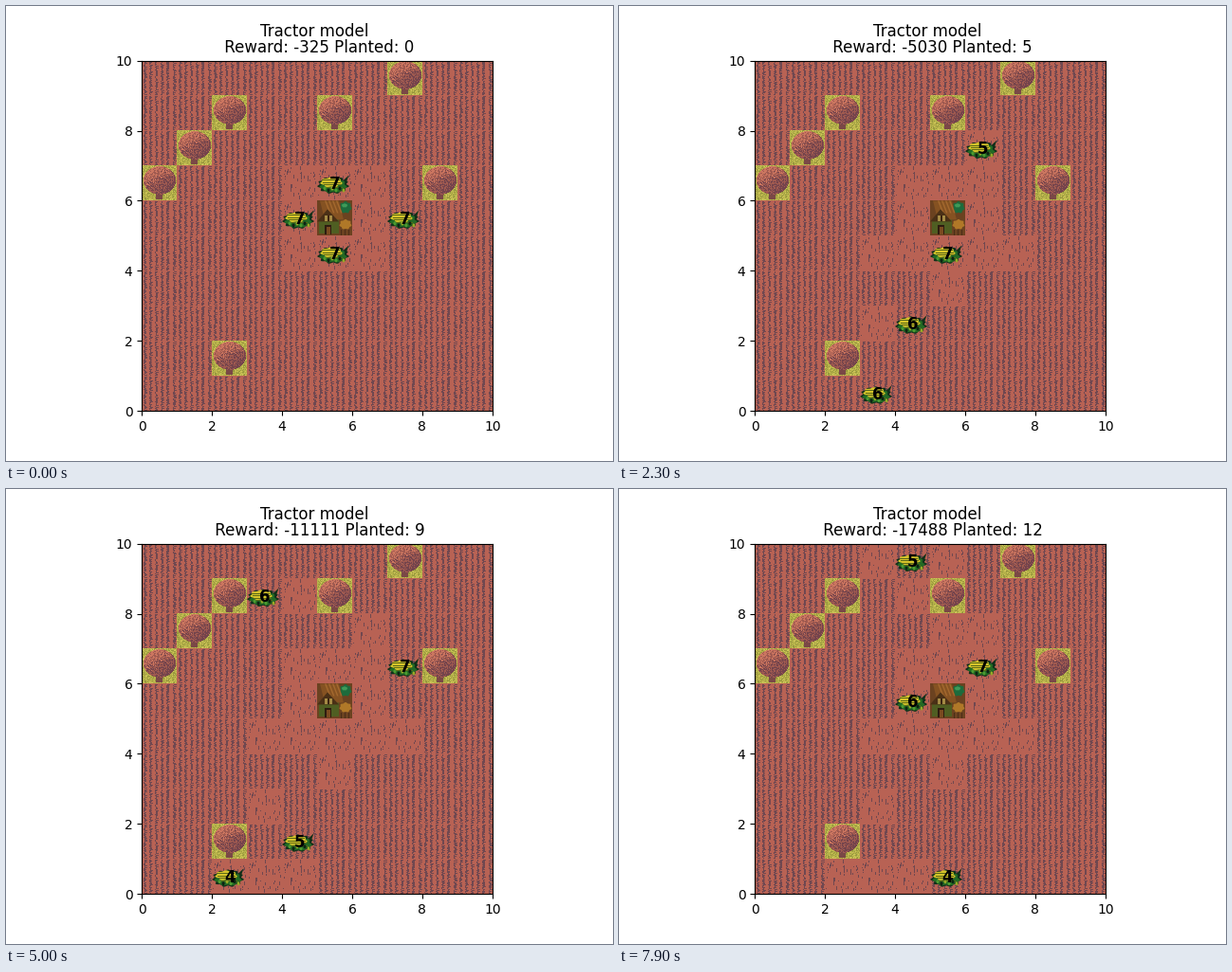
A matplotlib script that plays this animation: 640 px wide and 480 px high, repeating every 8 s.

```python
import random

import numpy as np
import matplotlib.pyplot as plt
from matplotlib.animation import FuncAnimation
from matplotlib.collections import PolyCollection
from matplotlib.transforms import Affine2D

FRAMES, STEP_MS = 80, 100
N, PX = 10, 37                      # cells per side, texture pixels per cell
SOIL, DARK = (184, 98, 84), (112, 72, 80)
FARM, FULL_LOAD = (5, 5), 7
TREES = [(0, 6), (1, 7), (2, 8), (5, 8), (7, 9), (8, 6), (2, 1)]
HOME = [(x, y) for x in (4, 5, 6) for y in (4, 5, 6)]

# At each key time every tractor has reached the last cell of its next leg.
KEY_TIMES = [0, 14, 33, 50, 58, 70, 79]
REWARDS = [-325, -3150, -7119, -11111, -13095, -15268, -17488]

# Earlier cells of a leg are stops: refill on home ground, plant elsewhere.
ROUTES = [
    ["56", "32", "32 20", "30 40 20", "20", "50", "50"],
    ["45", "34 34", "54 44", "76", "69", "59 48", "45"],
    ["75", "74 66", "67 65 56", "48 38", "39", "39 38", "49"],
    ["54", "53 53", "20 31", "41", "46", "57 77", "65 66"],
]

OPEN = {(x, y) for x in range(2, 8) for y in range(N)} - {FARM, *TREES}
rng = np.random.default_rng(4)
dice = random.Random(11)


def neighbours(cell):
    x, y = cell
    around = [(x + 1, y), (x - 1, y), (x, y + 1), (x, y - 1)]
    return [c for c in around if c in OPEN]


def distances(goal):
    dist, queue = {goal: 0}, [goal]
    for cell in queue:
        for c in neighbours(cell):
            if c not in dist:
                dist[c] = dist[cell] + 1
                queue.append(c)
    return dist


def wander(start, goal, steps):
    """Random walk that still reaches the goal in the given steps."""
    dist, path = distances(goal), [start]
    for left in reversed(range(steps)):
        here = path[-1]
        path.append(dice.choice(
            [c for c in neighbours(here) if dist[c] <= left] or [here]))
    return path[1:]


def drive(route, shift):
    """Return [cell, load] per frame and the (frame, cell) plantings."""
    legs = [[tuple(map(int, c)) for c in leg.split()] for leg in route]
    load = FULL_LOAD
    track, planted = [[legs[0][0], load]], []
    for t0, t1, cells in zip(KEY_TIMES, KEY_TIMES[1:], legs[1:]):
        for k, cell in enumerate(cells, 1):
            last = k == len(cells)
            t = t1 if last else t0 + (t1 - t0) * k // len(cells) + shift
            path = wander(track[-1][0], cell, t - len(track) + 1)
            track += [[c, load] for c in path]
            if not last:
                if cell in HOME:
                    load = FULL_LOAD
                else:
                    load -= 1
                    planted.append((t, cell))
                track[-1][1] = load
    return track, planted


def blank(color):
    return np.full((PX, PX, 3), color, np.uint8)


def furrow_tile(rows=6):
    tile = blank(SOIL)
    for left in np.linspace(2, PX - 4, rows).astype(int):
        for y in range(1, PX):
            x = left + rng.integers(0, 2)
            tile[y, x:x + rng.integers(1, 4)] = DARK
    return tile


def tilled_tile():
    tile = blank(SOIL)
    for _ in range(46):
        x, y = rng.integers(1, PX - 1), rng.integers(1, PX - 4)
        tile[y:y + rng.integers(1, 5), x] = DARK
    return tile


def tree_tile():
    tile = blank((182, 178, 74))
    y, x = np.mgrid[:PX, :PX]
    noise = rng.random((PX, PX))
    tile[noise < 0.3] = (152, 152, 62)
    tile[noise > 0.85] = (208, 198, 90)
    tile[(abs(x - 18) < 4) & (y > 26) & (y < 36)] = (122, 72, 70)
    crown = ((x - 18.5) / 17) ** 2 + ((y - 15.5) / 15) ** 2 < 1
    shade = (x - 18) / 50 + (y - 14) / 30 + noise - 0.5
    tile[crown] = (160, 90, 80)
    tile[crown & (shade < -0.3)] = (204, 118, 96)
    tile[crown & (shade > 0.25)] = (116, 68, 76)
    return tile


def put(field, cell, tile):
    x, y = cell
    top = (N - 1 - y) * PX
    field[top:top + PX, x * PX:(x + 1) * PX] = tile


def sprite(ax, shapes, z):
    """Add polygons given in cell pixels, y pointing down."""
    polys = [[(x / PX, 1 - y / PX) for x, y in pts] for pts, _ in shapes]
    art = PolyCollection(polys, facecolors=[c for _, c in shapes],
                         linewidths=0, zorder=z)
    ax.add_collection(art, autolim=False)
    return art


def place(art, cell):
    art.set_transform(Affine2D().translate(*cell) + art.axes.transData)


def box(x, y, w, h, slant=0):
    return [(x, y), (x + w, y), (x + w + slant, y + h), (x + slant, y + h)]


def blob(cx, cy, rx, ry, rag=0.1, spikes=7):
    a = np.linspace(0, 2 * np.pi, 6 * spikes)
    r = 1 + rag * np.sin(spikes * a)
    return list(zip(cx + rx * r * np.cos(a), cy + ry * r * np.sin(a)))


def house_shapes():
    gable = [(11, 9), (23, 22), (0, 22)]
    slats = [(box(x, 0, 1.5, 13, 5), "#a4692e") for x in range(8, 22, 4)]
    posts = [(box(x, 31, 1.5, 6), "#4a2c18") for x in range(25, 37, 4)]
    return [
        (box(0, 0, PX, PX), "#6b4220"),
        (blob(30, 7, 6, 6), "#1d6b3c"),
        (blob(29, 5, 3, 2), "#3f9a58"),
        (blob(30, 25, 6, 5), "#b07828"),
        (box(2, 20, 21, 15), "#4f5e22"),
        (box(3, 0, 20, 20, 5), "#855222"),
        *slats,
        (gable, "#4a3016"),
        (box(8, 16, 8, 6), "#a48a44"),
        (box(11, 16, 2, 6), "#3c2412"),
        (box(8, 26, 7, 10), "#2e1c10"),
        (box(10, 28, 4, 8), "#7a4a20"),
        *posts,
    ]


def tractor_shapes():
    rows = [(box(5 + k, 15 + 2.5 * k, 19, 1), "#5c6a18") for k in range(4)]
    leaves = [(blob(8 + 4 * k, 24 + 2 * (k % 2), 1.5, 2), color)
              for k, color in enumerate(["#4c9a30", "#0c2414", "#98a828"] * 2)]
    tip = [(25, 18), (33.5, 10), (30, 20)]
    return [
        (blob(17, 20.5, 15.5, 8.5, 0.1, 11), "#10301a"),
        (tip, "#10301a"),
        (blob(17, 21, 13.5, 7), "#236a24"),
        (blob(15, 17.5, 11, 5), "#d6c42a"),
        *rows,
        *leaves,
    ]


tracks, sown = [], []
for shift, route in enumerate(ROUTES, -1):
    track, planted = drive(route, shift)
    tracks.append(track)
    sown += planted

furrow, tilled, tree = furrow_tile(), tilled_tile(), tree_tile()
base = np.tile(furrow, (N, N, 1))
for cell in HOME:
    put(base, cell, tilled)
for cell in TREES:
    put(base, cell, tree)

fig, ax = plt.subplots(figsize=(6.4, 4.8), dpi=100)
ground = ax.imshow(base, extent=(0, N, 0, N), interpolation="nearest", zorder=0)
place(sprite(ax, house_shapes(), 2), FARM)
tractors = [sprite(ax, tractor_shapes(), 3) for _ in ROUTES]
labels = [ax.text(0, 0, "", size=12, weight="bold", ha="center", va="center",
                  zorder=4) for _ in ROUTES]
title = ax.set_title("", linespacing=0.92)
ticks = range(0, N + 1, 2)
ax.set(xlim=(0, N), ylim=(0, N), xticks=ticks, yticks=ticks)


def update(i):
    field = base.copy()
    done = [cell for t, cell in sown if t <= i]
    for cell in done:
        put(field, cell, tilled)
    ground.set_data(field)
    for art, label, track in zip(tractors, labels, tracks):
        (x, y), load = track[i]
        place(art, (x, y))
        label.set_position((x + 0.5, y + 0.47))
        label.set_text(str(load))
    reward = round(float(np.interp(i, KEY_TIMES, REWARDS)))
    title.set_text(f"Tractor model \n Reward: {reward} Planted: {len(done)}")
    return [ground, title, *tractors, *labels]


anim = FuncAnimation(fig, update, frames=FRAMES, interval=STEP_MS,
                     repeat=True, repeat_delay=0, blit=False)
plt.show()
```
